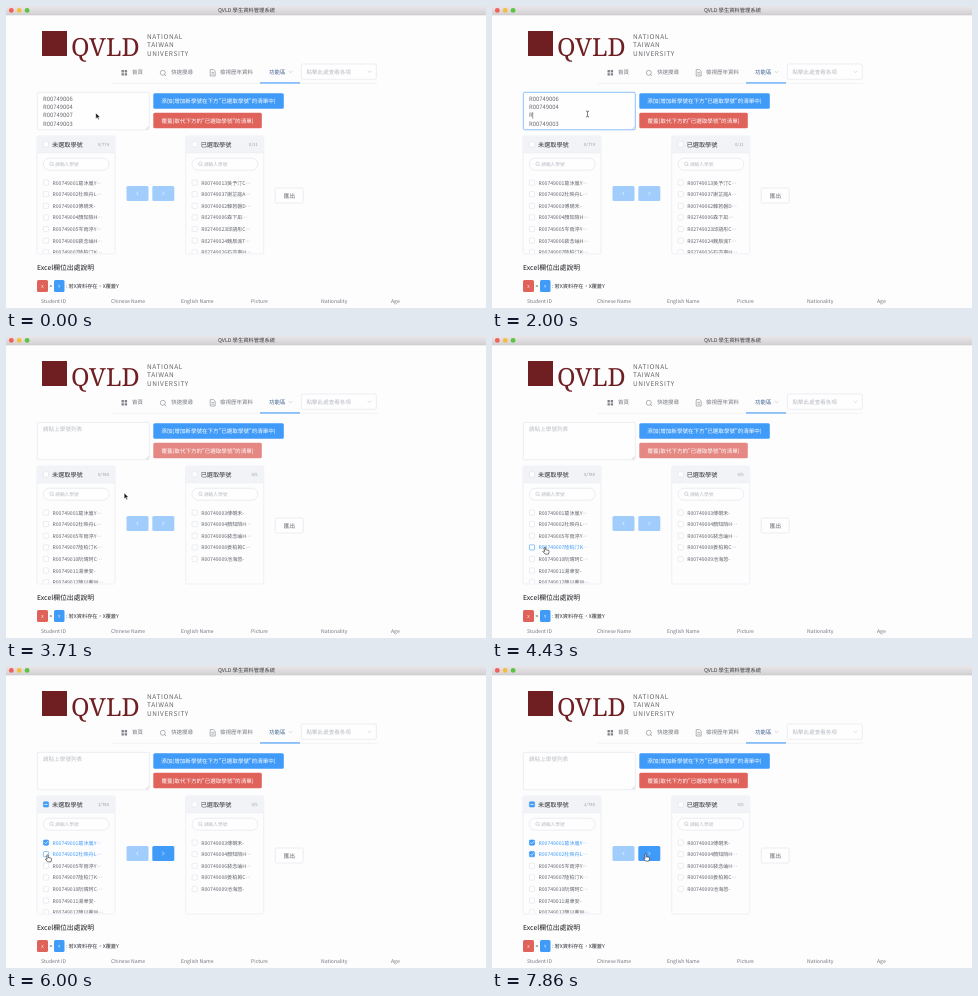
These frames come from a looping animation (480 px wide and 302 px high, 8000 ms). An HTML page:

```html
<!DOCTYPE html>
<html lang="zh-Hant">
<head>
<meta charset="utf-8">
<title>學生資料管理系統</title>
<style>
  html, body { margin: 0; width: 100%; height: 100%; overflow: hidden; background: #fdfdfe; }
  svg { display: block; width: 100%; height: 100%; }
  text {
    font-family: "Noto Sans CJK TC", "Noto Sans CJK SC", "Noto Sans CJK JP", "Noto Sans CJK", "Noto Sans", sans-serif;
    text-rendering: geometricPrecision;
    white-space: pre;
  }
  .serif { font-family: "Noto Serif", "Liberation Serif", serif; }
</style>
</head>
<body>
<svg viewBox="0 0 480 302">
  <defs>
    <linearGradient id="bar" x2="0" y2="1">
      <stop stop-color="#e9e7e9"/><stop offset="1" stop-color="#d2d0d2"/>
    </linearGradient>
    <clipPath id="listClip"><rect y="168" width="480" height="79.3"/></clipPath>
  </defs>
  <g id="base"></g>
  <g id="live"></g>
</svg>
<script>
const LOOP = 8000, STEP = 1000 / 7;
const BLUE = '#409bf8', PALE = '#a0cdfb', RED = '#df625b', PALE_RED = '#e58883';
const LINE = '#dfe1e7', HINT = '#b9bcc4', INK = '#64676d', DARK = '#303236';

const rect = (x, y, w, h, fill, stroke = 'none', r = 1.5, sw = .6) =>
  `<rect x="${x}" y="${y}" width="${w}" height="${h}" rx="${r}" fill="${fill}" stroke="${stroke}" stroke-width="${sw}"/>`;
const text = (x, y, size, fill, str, attrs = '') =>
  `<text x="${x}" y="${y}" font-size="${size}px" fill="${fill}" ${attrs}>${str}</text>`;
const path = (d, stroke, sw = .7, fill = 'none') =>
  `<path d="${d}" fill="${fill}" stroke="${stroke}" stroke-width="${sw}" stroke-linecap="round" stroke-linejoin="round"/>`;
const circle = (x, y, r, fill, stroke = 'none', sw = .7) =>
  `<circle cx="${x}" cy="${y}" r="${r}" fill="${fill}" stroke="${stroke}" stroke-width="${sw}"/>`;
const lens = (x, y, r, color) =>
  circle(x, y, r, 'none', color, .6) + path(`M${x + r * .7} ${y + r * .7}l${r * .5} ${r * .5}`, color, .6);
const chevron = (x, y, color) => path(`M${x - 1.6} ${y - .8}l1.6 1.6l1.6-1.6`, color, .5);

// Left list before and after the overwrite, then the right list
const before = [
  '001葛沐嵐Y…', '002杜映舟L…', '003傅硯禾-', '004顏知陌H…', '005岑雨渟Y…', '006裴念岫H…', '007陸柏汀K…'
].map(s => 'R00749' + s);
const after = [
  '001葛沐嵐Y…', '002杜映舟L…', '005岑雨渟Y…', '007陸柏汀K…', '010阮晴珂C…', '011湯聿安-', '012簡以蘅W…'
].map(s => 'R00749' + s);
const chosenBefore = [
  'R00749013吳予汀C…', 'R00749037謝芷庭A…', 'R00749062韓若磐D…', 'R02749006森下凪…',
  'R02749023邱語彤C…', 'R02749024魏辰渝T…', 'R02749026石亦寧H…'
];
const chosenAfter = [
  '003傅硯禾-', '004顏知陌H…', '006裴念岫H…', '008姜柏苒C…', '009池海悠-'
].map(s => 'R00749' + s);

function panelFrame(x, title) {
  return rect(x, 130, 78, 118, '#fdfdfe', '#e6e8ee') +
    rect(x + .3, 130.3, 77.4, 16.7, '#f1f3f6') +
    path(`M${x} 147h78`, '#e6e8ee', .5) +
    text(x + 15, 140.7, 6.15, DARK, title) +
    rect(x + 6.3, 152.2, 65.8, 12, '#fefefe', LINE, 6) +
    lens(x + 14.5, 157.8, 1.7, HINT) +
    text(x + 18.2, 160, 4.7, HINT, '請輸入學號');
}

function drawBase() {
  const nav = (x, str, fill = '#75787e') => text(x, 68.2, 5.5, fill, str);
  const heads = ['Student ID', 'Chinese Name', 'English Name', 'Picture', 'Nationality', 'Age'];
  return rect(0, 0, 480, 302, '#fdfdfe', 'none', 0) +
    rect(0, 0, 480, 9, 'url(#bar)', 'none', 0) +
    path('M0 9.1h480', '#bdbbbd', .4) +
    ['#f2605a', '#f4bd3f', '#5cc445'].map((c, i) => circle(5.3 + i * 7.9, 4.4, 2.4, c)).join('') +
    text(240.5, 6.4, 5.3, '#3c3c3e', 'QVLD 學生資料管理系統', 'text-anchor="middle"') +

    rect(36, 25, 25, 25, '#6f1f22', 'none', 0) +
    text(65, 49.6, 25, '#6f1f22', 'QVLD', 'class="serif"') +
    ['NATIONAL', 'TAIWAN', 'UNIVERSITY'].map((s, i) =>
      text(141, 32.5 + i * 8.7, 6.5, '#66666a', s, 'letter-spacing=".6"')).join('') +

    path('M106 77.3h265', '#e6e7ec', .5) +
    [0, 1, 2, 3].map(i => rect(115.5 + i % 2 * 3.2, 64 + (i >> 1) * 3.2, 2.4, 2.4, '#808389', 'none', .3)).join('') +
    nav(126, '首頁') +
    lens(156.8, 66.8, 2.5, '#808389') + nav(165, '快速搜尋') +
    path('M204.6 63.6h3l1.6 1.6v4.8h-4.6zM205.8 66.4h2M205.8 68.1h2', '#808389', .6) +
    nav(214, '檢視歷年資料') +
    nav(263, '功能區', '#3b5f8c') + chevron(284.5, 66, '#b0b3ba') +
    rect(254, 76.4, 40, 1.1, BLUE, 'none', 0) +
    rect(295.3, 58, 75, 15.3, '#fefefe', LINE) +
    text(300.5, 67.8, 5.55, HINT, '點擊此處查看各項') + chevron(363.5, 65.8, HINT) +

    rect(147.3, 87.3, 130.5, 15.5, BLUE) +
    text(212.5, 97.1, 5.55, '#fff', '添加(增加新學號在下方"已選取學號"的清單中)', 'text-anchor="middle"') +
    panelFrame(31, '未選取學號') + panelFrame(179.7, '已選取學號') +
    rect(120.5, 180, 22, 15, PALE) + path('M132 186l-1.4 1.5l1.4 1.5', '#fff', .6) +
    rect(269.2, 182, 28, 15, '#fefefe', LINE) + text(277.4, 191.7, 5.8, INK, '匯出') +

    text(31, 264, 6.85, '#1d1e20', 'Excel欄位出處說明', 'font-weight="500"') +
    rect(31, 274, 11, 12, RED) + text(36.5, 281.5, 4.2, '#fff', 'X', 'text-anchor="middle"') +
    text(43.4, 282, 5.2, DARK, '&gt;') +
    rect(48, 274, 10.5, 12, BLUE) + text(53.2, 281.5, 4.2, '#fff', 'Y', 'text-anchor="middle"') +
    text(60, 281.9, 5.2, DARK, ': 若X資料存在，X覆蓋Y') +
    heads.map((s, i) => text(35 + i * 70, 297.2, 5.1, '#73767d', s)).join('');
}

function checkbox(x, y, state, hot) {
  const on = state !== 'off';
  const mark = state === 'on' ? path(`M${x + 1.3} ${y + 2.7}l1 1.1l1.8-2.3`, '#fff', .7)
    : state === 'some' ? path(`M${x + 1.4} ${y + 2.6}h2.4`, '#fff', .8) : '';
  return rect(x, y, 5.2, 5.2, on ? BLUE : '#fefefe', on || hot ? BLUE : LINE, .8) + mark;
}

function list(x, rows, checked, hover) {
  return '<g clip-path="url(#listClip)">' + rows.map((s, i) => {
    const y = 176.6 + i * 11.6, on = i < checked, hot = i === hover;
    return checkbox(x + 6.4, y - 2.6, on ? 'on' : 'off', hot) +
      text(x + 15.5, y + 2, 5.1, on || hot ? BLUE : INK, s);
  }).join('') + '</g>';
}

function count(x, str) {
  return text(x + 72, 140.2, 4.2, '#9a9da5', str, 'text-anchor="end"');
}

function textarea(t) {
  const focused = t >= 560 && t < 3140;
  let out = rect(31.3, 86.3, 112, 37.5, '#fefefe', focused ? BLUE : LINE);
  if (t >= 3140) out += text(37, 95.2, 5.6, HINT, '請貼上學號列表');
  else {
    // Backspace eats the third line, then its line break
    const cut = Math.max(0, Math.floor((t - 1140) / 100));
    const ids = ['006', '004', '007', '003', '009'].map(s => 'R00749' + s);
    if (cut > 9) ids.splice(2, 1);
    else ids[2] = ids[2].slice(0, 9 - cut);
    out += ids.slice(0, 4).map((s, i) => text(37, 95 + i * 8.2, 5.85, INK, s)).join('');
    if (focused && (cut > 0 && cut < 11 || t % 1000 > 450)) {
      const row = cut > 9 ? 1 : 2, n = ids[row].length;
      out += path(`M${37.4 + n * 3.3} ${90 + row * 8.2}v6`, '#444', .5);
    }
  }
  return out + path('M142.4 120.6l-2.4 2.4M142.4 122.2l-.8.8', '#a6a8ad', .4);
}

// time, x, y of the pointer tip
const track = [
  [0, 89.8, 107], [300, 89.8, 107], [570, 95.5, 108], [2140, 95.5, 108], [2710, 176, 110],
  [3290, 176, 110], [4150, 58, 206], [4430, 53, 211], [5000, 40, 177], [5290, 40, 178],
  [5430, 41.5, 191], [6290, 41.5, 188], [6570, 148, 193], [7000, 153.5, 188], [8000, 153.5, 188]
];

function pointer(t) {
  const i = Math.max(1, track.findIndex(p => p[0] > t));
  const [t0, x0, y0] = track[i - 1], [t1, x1, y1] = track[i];
  const k = (t - t0) / (t1 - t0), e = k * k * (3 - 2 * k);
  return [x0 + (x1 - x0) * e, y0 + (y1 - y0) * e];
}

function cursor(t) {
  const [x, y] = pointer(t);
  let art;
  if (x < 144 && y < 124 && t > 430)
    art = path('M-1.2-3q1.2 0 1.2.8v4.4q0 .8-1.2.8M1.2-3q-1.2 0-1.2.8M1.2 3q-1.2 0-1.2-.8', '#333', .6);
  else if (t < 2140 || y < 106 || (t > 3290 && t < 4000))
    art = path('M0 0v5.8l1.4-1.2l1 2.2l1-.5l-1-2.1h1.8z', '#fff', .5, '#111');
  else
    art = path('M-.7.4q.7-1 1.3 0v2.3l2.8.6q.9.3.7 1.2l-.6 2.6h-3.4l-2.2-2.6q-.1-1 1.4-.2z', '#222', .6, '#fff');
  return `<g transform="translate(${x} ${y})">${art}</g>`;
}

function hoverRow(t) {
  const marks = [[4280, 3], [4570, 2], [4850, 0], [5570, 1], [6710, -1]];
  return marks.reduce((row, [at, r]) => t >= at ? r : row, -1);
}

function drawLive(t) {
  const moved = t >= 3140;
  const checked = (t >= 5570) + (t >= 6710);
  const pale = t >= 2570 && t < 5570;
  return textarea(t) +
    rect(147.3, 106.8, 108.5, 15.4, pale ? PALE_RED : RED) +
    text(201.5, 116.5, 5.55, '#fff', '覆蓋(取代下方的"已選取學號"的清單)', 'text-anchor="middle"') +
    checkbox(37.4, 135.8, checked ? 'some' : 'off') + checkbox(186.1, 135.8, 'off') +
    count(31, moved ? checked + '/780' : '0/774') + count(179.7, moved ? '0/5' : '0/11') +
    list(31, moved ? after : before, checked, hoverRow(t)) +
    list(179.7, moved ? chosenAfter : chosenBefore, 0, -1) +
    rect(146.3, 180, 22, 15, checked ? BLUE : PALE) + path('M156.6 186l1.4 1.5l-1.4 1.5', '#fff', .6) +
    cursor(t);
}

const live = document.getElementById('live');
document.getElementById('base').innerHTML = drawBase();
let shown = -1;

function update(now) {
  const step = Math.floor((now % LOOP + 5) / STEP) % 56;
  if (step !== shown) {
    shown = step;
    live.innerHTML = drawLive(step * STEP);
  }
}
const start = performance.now();
(function tick() {
  update(performance.now() - start);
  requestAnimationFrame(tick);
})();
</script>
</body>
</html>
```
